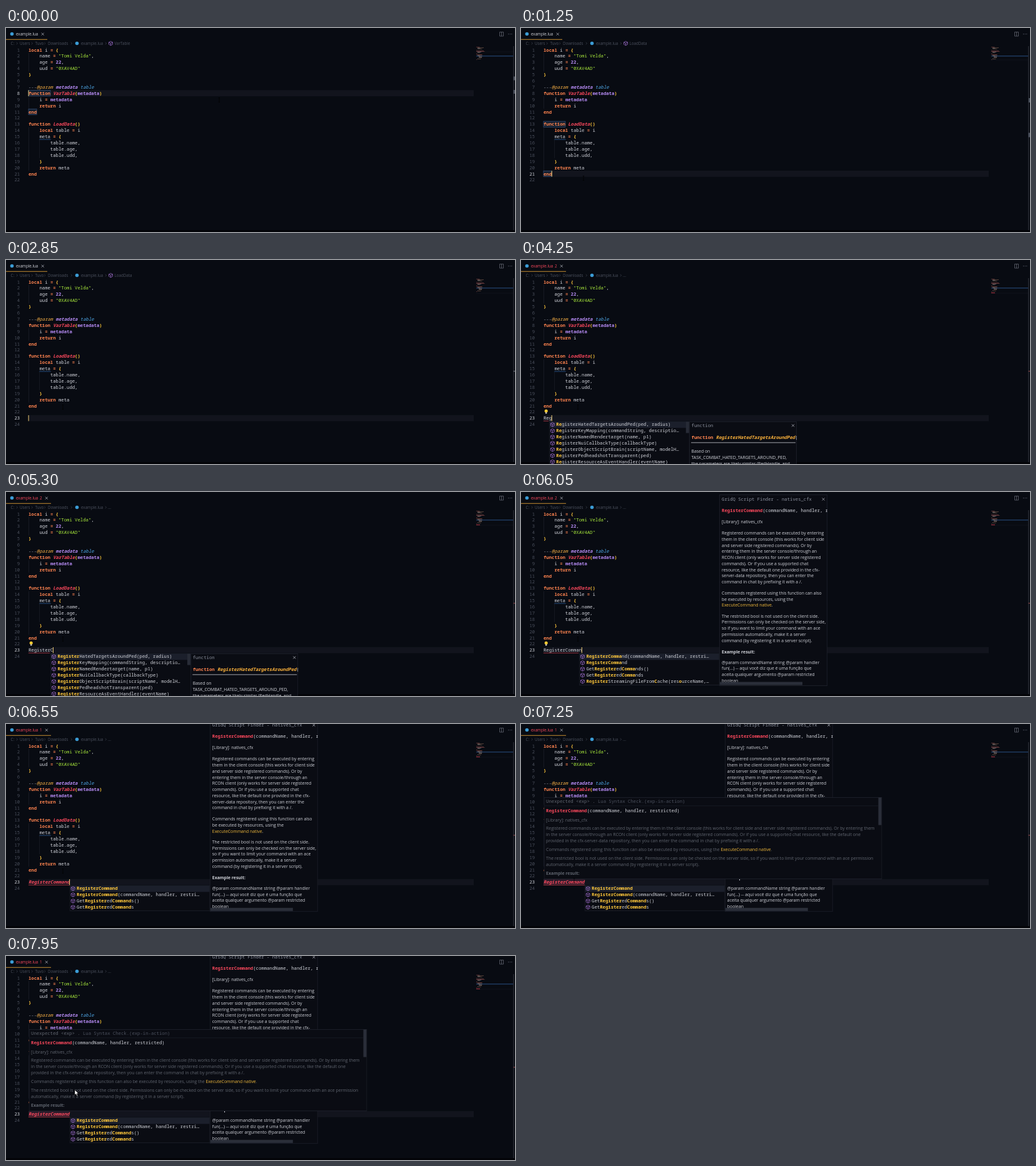
Recreate the animation shown at these times as an HTML page. Size 814x326 px, loop 8000 ms.

```html
<!DOCTYPE html>
<html lang="en">
<head>
<meta charset="utf-8">
<title>Code editor</title>
<style>
html, body { margin: 0; width: 100%; height: 100%; overflow: hidden; background: #080b12; }
svg { display: block; }
text { white-space: pre; }
.mono { font: 500 7.28px "Noto Sans Mono", "DejaVu Sans Mono", monospace; }
.ui { font: 6.24px "Open Sans", "Noto Sans", sans-serif; }
.doc { font: 6.88px "Open Sans", "Noto Sans", sans-serif; }
.hover { font: 6.93px "Open Sans", "Noto Sans", sans-serif; }
.end { text-anchor: end; }
.w { fill: #d0d2d9; }
.o { fill: #ff8450; font-weight: 700; }
.r { fill: #f8485c; font-weight: 600; font-style: italic; }
.R { fill: #f8485c; font-weight: 600; }
.e { fill: #f4485c; }
.y { fill: #ffc83c; font-weight: 700; }
.s { fill: #a8e83c; }
.p { fill: #b78cf5; font-weight: 700; }
.P { fill: #b78cf5; font-weight: 700; font-style: italic; }
.a { fill: #f5ae45; font-style: italic; }
.b { fill: #4fa8e8; font-style: italic; }
.f { fill: #ffb43c; font-weight: 700; font-style: italic; }
.c { fill: #8a8f9c; }
.d { fill: #4b505d; }
.D { fill: #60656f; }
.B { font-weight: 700; }
.l { fill: #f0b93c; }
</style>
</head>
<body>
<svg id="stage" width="814" height="326"></svg>
<script>
const CH = 4.368, LEFT = 36, LOOP = 8000;
const rowY = n => 34.9 + 9.9 * (n - 1);
const times = (n, fn) => Array.from({length: n}, (_, i) => fn(i)).join('');

const code = `§olocal §wi §o= §y{
    name §o=§w §s"Tomi Velda"§w,
    age §o=§w §p22§w,
    uud §o=§w §s"0XAV4AD"
§y}

§c---§a@param §Pmetadata §btable
§ofunction §rVarTable§y(§pmetadata§y)
    i §o=§w §pmetadata
    §oreturn §wi
§oend

§ofunction §rLoadData§y()
    §olocal §wtable §o=§w i
    meta §o=§w §y{
        §wtable.name,
        table.age,
        table.udd,
    §y}
    §oreturn §wmeta
§oend`.split('\n');

const word = 'RegisterCommand';
const keys = [3950, 4060, 4170, 4290, 4400, 4500, 4600, 4700, 5250, 5500, 5600, 5700, 5800, 6050, 6200];
const CLICK = 800, ENTERS = [2450, 2750], ACCEPT = 6400, HOVER = 7150;
const resets = [-200, CLICK, ...ENTERS, ...keys, ACCEPT];
const mousePath = [[50, 341, 115], [750, 100, 240], [1300, 100, 240], [1700, 91, 235],
  [6600, 91, 235], [6850, 85, 250], [7350, 85, 250], [7800, 110, 214]];

const natives = ['HatedTargetsAroundPed(ped, radius)', 'KeyMapping(commandString, descriptio…',
  'NamedRendertarget(name, p1)', 'NuiCallbackType(callbackType)',
  'ObjectScriptBrain(scriptName, modelH…', 'PedheadshotTransparent(ped)',
  'ResourceAsEventHandler(eventName)'];
const args = '(commandName, handler, restri…';
const getters = ['Get§yRegister§wed§yComma§wnds()', 'Get§yRegister§wed§yComma§wnds'];
const partial = ['§yRegisterComma§wnd' + args, '§yRegisterComma§wnd', ...getters,
  '§yRegister§wStreamingFileFrom§yC§wache(res§yo§wurceName,…'];
const complete = ['§yRegisterCommand', '§yRegisterCommand§w' + args, ...getters.map(g => g.replace('Comma§wnd', 'Command§w'))];

const docs = [
  [62, `Registered commands can be executed by entering
them in the client console (this works for client side
and server side registered commands). Or by
entering them in the server console/through an
RCON client (only works for server side registered
commands). Or if you use a supported chat
resource, like the default one provided in the cfx-
server-data repository, then you can enter the
command in chat by prefixing it with a /.`],
  [157.7, `Commands registered using this function can also
be executed by resources, using the
§lExecuteCommand native§w.`],
  [194.5, `The restricted bool is not used on the client side.
Permissions can only be checked on the server side,
so if you want to limit your command with an ace
permission automatically, make it a server
command (by registering it in a server script).`],
  [251.5, '§w<tspan class="B">Example result:</tspan>'],
  [268.5, `@param commandName string @param handler
fun(...) -- aqui você diz que é uma função que
aceita qualquer argumento @param restricted
boolean`]];

const hoverDocs = [
  [36.5, '[Library]: natives_cfx'],
  [50, `Registered commands can be executed by entering them in the client console (this works for client side and server side registered commands). Or by entering them
in the server console/through an RCON client (only works for server side registered commands). Or if you use a supported chat resource, like the default one
provided in the cfx-server-data repository, then you can enter the command in chat by prefixing it with a /.`],
  [84, 'Commands registered using this function can also be executed by resources, using the §lExecuteCommand native§D.'],
  [98.3, `The restricted bool is not used on the client side. Permissions can only be checked on the server side, so if you want to limit your command with an ace permission
automatically, make it a server command (by registering it in a server script).`],
  [122, '§D<tspan class="B">Example result:</tspan>']];

// "§x" inside a string switches to class x
const spans = (s, first) => (first + s).split('§')
  .map(p => `<tspan class="${p[0]}">${p.slice(1)}</tspan>`).join('');
const text = (x, y, s, cls = 'mono', first = 'w') =>
  `<text x="${x}" y="${y + 2.6}" class="${cls}">${spans(s, first)}</text>`;
const rect = (x, y, w, h, fill, more = '') =>
  `<rect x="${x}" y="${y}" width="${w}" height="${h}" fill="${fill}" ${more}/>`;
const path = (d, stroke, more = '') => `<path d="${d}" fill="none" stroke="${stroke}" ${more}/>`;
const box = (x, y, w, h, body) => `<svg x="${x}" y="${y}" width="${w}" height="${h}">` +
  rect(.5, .5, w - 1, h - 1, '#0a0c13', 'stroke="#1b1e28"') +
  `<g transform="translate(0 -.5)">${body}</g></svg>`;
const paras = (x, list, cls, first, pitch) => list.map(([y, s]) =>
  s.split('\n').map((line, i) => text(x, y + i * pitch, line, cls, first)).join('')).join('');
const cross = (x, y, c = '#b4b7c0') =>
  path(`M${x - 2} ${y - 2}l4 4m0-4l-4 4`, c, 'stroke-width=".8"');
const cube = (x, y, c = '#a874d8') =>
  path(`M${x} ${y - 3.2}l3 1.5v3.4l-3 1.6l-3-1.6v-3.4zm-3 1.5l3 1.6l3-1.6m-3 1.6v3.4`, c, 'stroke-width=".7"');
const dot = (x, y) => `<circle cx="${x}" cy="${y}" r="2.8" fill="#3b9bd4"/>`;
const squiggle = (x, y, w, c) =>
  path(`M${x} ${y}` + 'l1 -1l1 1'.repeat(Math.round(w / 2)), c, 'stroke-width=".7"');
const guide = (col, from, to) =>
  rect(LEFT + col * CH, rowY(from) - 5, .6, (to - from + 1) * 9.9, '#22252f');

function mouseAt(t) {
  const i = mousePath.findIndex(p => p[0] > t);
  if (i === 0) return mousePath[0].slice(1);
  if (i < 0) return mousePath.at(-1).slice(1);
  const [a, b] = [mousePath[i - 1], mousePath[i]];
  const k = (t - a[0]) / (b[0] - a[0]), e = k * k * (3 - 2 * k);
  return [a[1] + (b[1] - a[1]) * e, a[2] + (b[2] - a[2]) * e];
}

function header(t, error) {
  const badge = t < ACCEPT ? 2 : 1, tabW = error ? 72 : 66;
  const crumbs = [[7.5, 'C:'], [22, 'Users'], [46.5, 'Tuvo'], [67, 'Downloads'], [120, 'example.lua']];
  let s = rect(0, 17.8, tabW, .9, '#d99a35') + dot(9.5, 9.5) + dot(113.5, 24.5);
  s += text(16, 9.8, 'example.lua', 'ui', error ? 'e' : 'w');
  if (error) s += text(54, 9.8, String(badge), 'ui', 'e');
  s += cross(error ? 64.8 : 58.7, 9.7);
  s += crumbs.map(([x, c]) => text(x, 24.4, c, 'ui', 'd')).join('');
  s += [17.5, 41.5, 62, 104.5, 159.5].map(x =>
    path(`M${x - .8} 22.8l1.8 1.8l-1.8 1.8`, '#4b505d', 'stroke-width=".6"')).join('');
  s += error ? text(163, 24.4, '...', 'ui', 'd')
    : cube(167.5, 24.5) + text(173.5, 24.4, t < CLICK ? 'VarTable' : 'LoadData', 'ui', 'd');
  s += path('M789.5 6.5h6v6.5h-6zm3 0v6.5', '#6a6f7a', 'stroke-width=".7"');
  return s + times(3, i => rect(803 + i * 2.6, 9.2, 1, 1, '#6a6f7a'));
}

function minimap(t, row, error) {
  const tint = ['#74403f', '#6d717b', '#6f5446'];
  let s = rect(752, 29.6 + row, 59, 1, '#10131c') + rect(752, 44.4, 59, .9, '#2d568f');
  code.forEach((line, i) => {
    const plain = line.replace(/§./g, ''), pad = plain.search(/\S|$/);
    if (plain) s += rect(752 + pad * .5, 30 + i, (plain.length - pad) * .5, .7,
      tint[line[0] === '§' ? 0 : 1 + i % 2]);
  });
  if (error) s += rect(752, 52, 6, .9, '#c03a48');
  s += rect(811, 29, 1.2, 294, '#2b2e36');
  if (t < CLICK) s += rect(811.5, 77.5, 2.5, 6, '#4a505c') + rect(811.5, 99, 2.5, 6, '#4a505c');
  else if (t < ENTERS[0]) s += rect(812, 112, 2, 7, '#4a505c') + rect(811.5, 167.5, 2.5, 7, '#4a505c');
  else s += rect(811.5, 177.3, 2.5, 1, error ? '#9a4a4c' : '#7d828d');
  return s;
}

function editor(t, row, typed, error) {
  const pair = t < CLICK ? [8, 11] : t < ENTERS[0] ? [13, 21] : [];
  const lines = 22 + ENTERS.filter(e => t >= e).length;
  let s = rect(LEFT, rowY(row) - 4.9, 712, 9.8, '#12141d');
  if (t >= HOVER) s += rect(LEFT, rowY(row) - 4.9, word.length * CH, 9.8, '#2b1c2a');
  s += guide(0, 2, 4) + guide(0, 9, 10) + guide(0, 14, 20) + guide(4, 16, 18);
  s += pair.map((n, i) => rect(LEFT, rowY(n) - 4.6, (i ? 3 : 8) * CH, 9.2, '#16202f',
    'stroke="#35507a" stroke-width=".7"')).join('');
  s += times(lines, i => text(22.2, rowY(i + 1), String(i + 1), 'mono end', i + 1 === row ? 'w' : 'd'));
  s += code.map((line, i) => text(LEFT, rowY(i + 1), line)).join('');
  s += squiggle(LEFT + 4 * CH, 178.6, 4 * CH, '#3f7fd0');
  if (typed) s += text(LEFT, rowY(23), word.slice(0, typed), 'mono', t < ACCEPT ? 'w' : 'r');
  if (error) s += squiggle(LEFT, 257.8, Math.max(1, typed - (t < ACCEPT)) * CH, '#e0404c');
  if (error && t < ACCEPT) s += '<circle cx="40.2" cy="241.2" r="2.5" fill="#ffcc33"/>' + rect(39, 243.5, 2.4, 2, '#d8d8d8');
  const last = resets.filter(r => r <= t).at(-1);
  if (Math.floor((t - last) / 500) % 2 === 0) {
    const col = row === 21 ? 3 : row === 23 ? typed : 0;
    s += rect(LEFT + col * CH - .4, rowY(row) - 4.7, 1, 9.4, '#f3cf78');
  }
  return s;
}

function suggest(t, col) {
  const tall = t >= 5700;
  const n = Math.min(col, 8);
  const rows = !tall ? natives.map(r => `§y${word.slice(0, n)}§w${word.slice(n, 8)}${r}`)
    : t < ACCEPT ? partial : complete;
  const x = LEFT + col * CH, sideX = x + 224.3;
  let list = rect(1, 1, 223, 9.8, '#1b1f2b') + rows.map((r, i) =>
    cube(5.6, 5.5 + i * 9.9) + text(11.6, 5 + i * 9.9, r)).join('');
  if (!tall) list += rect(219, 1, 5, 18, '#272b36');
  let s = box(x, 258, 225, rows.length * 9.9 + 1.5, list);
  if (tall) {
    s += box(sideX, t < ACCEPT ? 4 : -5.7, 173, 306,
      text(4, 8, 'GridQ Script Finder - natives_cfx', 'mono', 'c') + cross(166.5, 8) +
      text(4, 26, '§RRegisterCommand§w(commandName, handler, restricted)') +
      text(4, 44, '[Library]: natives_cfx', 'doc') +
      paras(4, docs, 'doc', 'w', 9.75) + rect(1, 300, 132, 5, '#2a2e39'));
  } else {
    s += box(sideX, 258, 172, 80,
      text(3.5, 7, 'function', 'mono', 'c') + cross(166, 7) +
      text(3.5, 25.5, '§ofunction §fRegisterHatedTargetsAroundPed§w(') + rect(3, 34, 167, .8, '#c8cad2') +
      paras(3.5, [[48, 'Based on\nTASK_COMBAT_HATED_TARGETS_AROUND_PED,\nthe parameters are likely similar (PedHandle, and']],
        'doc', 'w', 9.75));
  }
  return s;
}

function hover(t) {
  const alpha = Math.min(1, (t - HOVER) / 100);
  return `<g opacity="${alpha}">` + box(36.5, 117, 541, 131,
    text(3.6, 7, 'Unexpected &lt;exp> . §dLua Syntax Check.(exp-in-action)', 'mono', 'D') +
    rect(1, 14, 534, .7, '#1b1e28') +
    text(3.6, 21.6, '§RRegisterCommand§w(commandName, handler, restricted)') +
    paras(3.6, hoverDocs, 'hover', 'D', 9.9) + rect(535, 1, 5, 44, '#2a2e39')) + '</g>';
}

function mouse(t) {
  const [x, y] = mouseAt(t);
  return t > 7400
    ? `<path transform="translate(${x} ${y})" d="M0 0v8l1.9-1.7l1.3 3l1.4-.6l-1.3-2.9h2.6z" fill="#fff" stroke="#000" stroke-width=".5"/>`
    : path(`M${x - 1.2} ${y - 3.5}h2.4m-1.2 0v7m-1.2 0h2.4`, '#000', 'stroke-width=".7"');
}

function scene(t) {
  const count = at => keys.filter(k => k <= at).length;
  const row = t < CLICK ? 8 : 21 + ENTERS.filter(e => t >= e).length;
  const error = t >= 4000;
  return rect(0, 0, 814, 326, '#080b12') + rect(0, 323, 814, 3, '#030408') +
    header(t, error) + minimap(t, row, error) + editor(t, row, count(t), error) +
    (t >= 4100 ? suggest(t, count(t - 100)) : '') +
    (t >= HOVER ? hover(t) : '') + mouse(t);
}

const stage = document.getElementById('stage');
function frame() {
  stage.innerHTML = scene(performance.now() % LOOP);
  requestAnimationFrame(frame);
}
frame();
</script>
</body>
</html>
```
